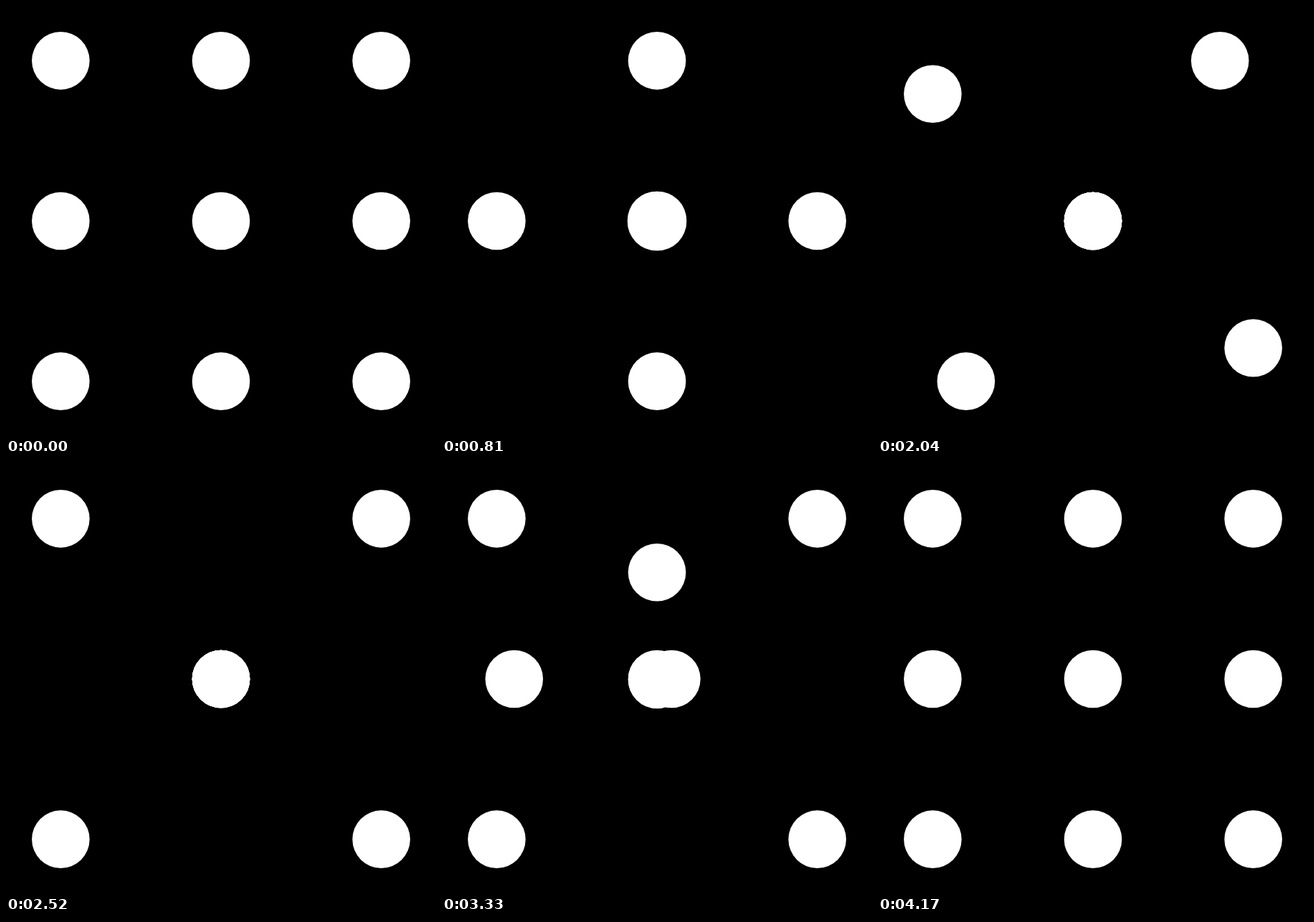
Write an HTML page with a canvas that moves like this. It is 600 px wide and 600 px high and loops after 4500 ms.

```html
<!DOCTYPE html>
<html lang="en">
<head>
<meta charset="utf-8">
<title>Nine dots</title>
<style>
  html, body { margin: 0; width: 100%; height: 100%; overflow: hidden; background: #000; }
  canvas { display: block; width: 100vmin; height: 100vmin; }
</style>
</head>
<body>
<canvas width="600" height="600"></canvas>
<script>
const ctx = document.querySelector('canvas').getContext('2d');
const LOOP = 4500, STEP = 30, MOVE = 905;
const CENTER = 300, GAP = 223.65, RADIUS = 40.3;
const GATHER = 0, TURN = 1620, SPREAD = 2820, STAGGER = 150;

// Unit directions: left, top, right, bottom.
const sides = [[-1, 0], [0, -1], [1, 0], [0, 1]];

// Cubic Bézier (0.61, 0, 0, 1), solved by bisection.
function ease(x) {
  if (x <= 0) return 0;
  if (x >= 1) return 1;
  let low = 0, high = 1;
  for (let i = 0; i < 30; i++) {
    const s = (low + high) / 2;
    if (1.83 * s * (1 - s) ** 2 + s ** 3 < x) low = s; else high = s;
  }
  return low * low * (3 - 2 * low);
}

function dot(x, y) {
  ctx.beginPath();
  ctx.arc(CENTER + GAP * x, CENTER + GAP * y, RADIUS, 0, 2 * Math.PI);
  ctx.fill();
}

function draw(time) {
  const progress = start => ease((time - start) / MOVE);
  const inward = 1 - progress(GATHER), turn = progress(TURN);

  ctx.fillStyle = '#000';
  ctx.fillRect(0, 0, 600, 600);
  ctx.fillStyle = '#fff';
  dot(0, 0);

  sides.forEach(([x, y], i) => {
    // Each side dot slides clockwise along its edge into a corner.
    dot(x - y * turn, y + x * turn);

    // Corner dots gather in the middle, then leave one by one for the sides.
    if (time < SPREAD) {
      dot((x - y) * inward, (y + x) * inward);
    } else {
      const out = progress(SPREAD + i * STAGGER);
      dot(x * out, y * out);
    }
  });
}

function frame(now) {
  draw(Math.floor((now % LOOP) / STEP + 0.05) * STEP % LOOP);
  requestAnimationFrame(frame);
}
draw(0);
requestAnimationFrame(frame);
</script>
</body>
</html>
```
